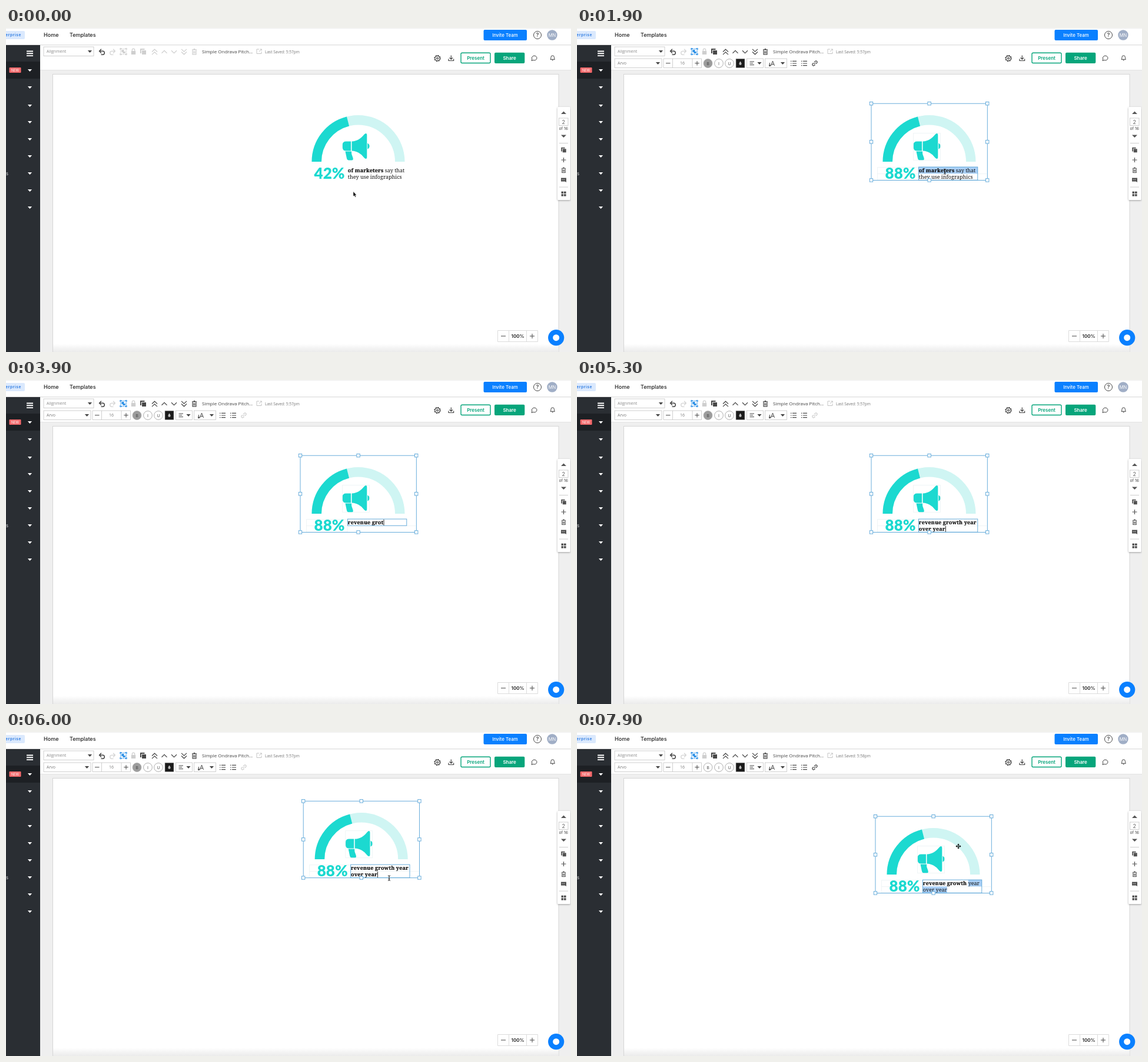
Animation, 960 px wide and 550 px high, one loop 8000 ms. Source, as an HTML page:

```html
<!DOCTYPE html>
<html lang="en">
<head>
<meta charset="utf-8">
<title>Infographic editor</title>
<style>
html, body { margin: 0; width: 100%; height: 100%; overflow: hidden; background: #fff; }
svg { display: block; width: 100vw; height: 100vh; }
text { white-space: pre; font-family: Inter, sans-serif; fill: #222; }
.ui { font-family: "Open Sans", sans-serif; font-size: 7px; fill: #777; }
.mid { text-anchor: middle; }
.body { font: 9px "Noto Serif", serif; fill: #111; }
.b { font-weight: 700; letter-spacing: .13px; stroke: #111; stroke-width: .18; }
.num { font: 900 26px Lato, sans-serif; fill: #1cd9d0; text-anchor: end; }
.line { fill: none; stroke: #444; stroke-width: 1.2; }
.thin { stroke-width: 1; }
.box { fill: #fff; stroke: #c4c4c4; stroke-width: .8; }
.acts { color: #cfcfcf; }
.acts.on { color: #484848; }
.ic { fill: none; stroke: currentColor; stroke-width: 1.2; }
.fill { fill: currentColor; stroke: none; }
.guide { fill: none; stroke: #e4eef0; stroke-width: .6; }
.sel { fill: none; stroke: #5aa5d8; stroke-width: .9; }
.handle { fill: #fff; stroke: #5aa5d8; stroke-width: .9; }
</style>
</head>
<body>
<svg viewBox="0 0 960 550">
  <defs>
    <linearGradient id="fade" x1="0" y1="0" x2="0" y2="1">
      <stop offset="0" stop-color="#fff"/><stop offset="1" stop-color="#ebebeb"/>
    </linearGradient>
    <filter id="shadow" x="-30%" y="-10%" width="160%" height="120%">
      <feDropShadow dx="0" dy="1" stdDeviation="1.5" flood-opacity=".35"/>
    </filter>
    <path id="caret" d="M-3.6-1.9H3.6L0 2z"/>
    <path id="chev" d="M-4.5 2.3L0-2L4.5 2.3"/>
    <path id="copy" class="fill" d="M-5-5H2.5V-3H-3V3H-5z M-2-2H5V5H-2z"/>
    <path id="bin" d="M-3-2.6V4.6H3V-2.6M-4-3.4H4M-1.3-4.6H1.3M-1-1V3M1-1V3"/>
    <path id="list" d="M-2-3.6H5M-2 0H5M-2 3.6H5M-5-3.6h1.5M-5 0h1.5M-5 3.6h1.5"/>
  </defs>

  <!-- page -->
  <rect width="960" height="550" fill="#fff"/>
  <rect x="58" y="72" width="902" height="478" fill="#efefef"/>
  <rect x="79.5" y="78.5" width="859.5" height="475" fill="#fff" stroke="#d6d6d6"/>
  <rect x="80" y="536" width="858.5" height="14" fill="url(#fade)"/>
  <path d="M58 71.5H960" stroke="#e4e4e4"/>
  <path d="M0 28.8H960" stroke="#d4d4d4"/>
  <path d="M0 .3H960" stroke="#d8d8d8" stroke-width=".6"/>

  <!-- header -->
  <rect x="-10" y="5" width="42" height="14" rx="2" fill="#dbe9fd"/>
  <text x="26" y="14.3" font-size="6.6" font-weight="600" letter-spacing=".6" text-anchor="end" style="fill:#2878e0">Enterprise</text>
  <text x="64" y="15.3" font-size="9" font-weight="500">Home</text>
  <text x="108" y="15.3" font-size="9" font-weight="500">Templates</text>
  <rect x="811.5" y="3" width="73.5" height="18" rx="2" fill="#0a80ff"/>
  <text class="mid" x="848" y="15" font-size="7.9" font-weight="500" style="fill:#fff">Invite Team</text>
  <circle class="line thin" cx="903" cy="12" r="6.5"/>
  <text class="mid" x="903" y="15" font-size="8.5" font-weight="500">?</text>
  <circle cx="928" cy="12" r="8.7" fill="#a0aec6"/>
  <text class="mid" x="928" y="14.8" font-size="7.5" style="fill:#fff">MN</text>

  <!-- sidebar -->
  <rect y="29" width="58" height="521" fill="#2a2e33"/>
  <rect y="57" width="58" height="29" fill="#1d2024"/>
  <path d="M35 39.5H46M35 43.3H46M35 47.1H46" stroke="#fff" stroke-width="1.9"/>
  <rect x="5.5" y="67" width="20" height="9" rx="1" fill="#f5696b"/>
  <text class="mid" x="15.5" y="73.6" font-size="5.6" style="fill:#fff">NEW</text>
  <text x="0" y="250" font-size="7.5" style="fill:#ddd">s</text>
  <g id="carets" fill="#fff"></g>

  <!-- toolbar, first row -->
  <rect class="box" x="64" y="32" width="85" height="15.5"/>
  <text class="ui" x="69" y="42.4" style="fill:#888">Alignment</text>
  <use href="#caret" x="142.5" y="40" fill="#444"/>
  <path id="undo" d="M158.8 39.300H165A3.100 3.100 0 0 1 165 45.300H161.500M162 35.800L158.600 39.300L162 42.800" fill="none" stroke="#444" stroke-width="1.500"/>
  <path d="M185 39.300H179A3.100 3.100 0 0 0 179 45.300H182.500M182 35.800L185.400 39.300L182 42.800" fill="none" stroke="#d4d4d4" stroke-width="1.300"/>
  <g id="group" color="#cfcfcf" transform="translate(199.500 40)">
    <path class="ic thin" d="M-4.500-4.500H4.500V4.500H-4.500z" stroke-dasharray="2 1"/>
    <path class="fill" d="M-3-3H1V0H3V3H-1V1H-3z"/>
    <path class="ic thin" d="M-5.500-3V-5.500H-3M3-5.500H5.500V-3M5.500 3V5.500H3M-3 5.500H-5.500V3"/>
  </g>
  <g color="#cfcfcf"><path class="fill" d="M212.800 39H220.200V45H212.800z"/><path class="ic" d="M214.300 39V37.300a2.200 2.200 0 0 1 4.400 0V39"/></g>
  <g class="acts" id="acts">
    <use href="#copy" x="233" y="40"/>
    <g class="ic">
      <use href="#chev" x="252.500" y="38.200"/><use href="#chev" x="252.500" y="42.800"/>
      <use href="#chev" x="269" y="40.400"/>
      <use href="#chev" transform="translate(285.500 40.600) scale(1 -1)"/>
      <use href="#chev" transform="translate(302.500 38.200) scale(1 -1)"/><use href="#chev" transform="translate(302.500 42.800) scale(1 -1)"/>
      <use href="#bin" x="320" y="40.300"/>
    </g>
  </g>
  <text class="ui" x="333" y="43.300" style="font-size:8px;fill:#444">Simple Ondrava Pitch...</text>
  <path d="M430 36H426V43.500H434V40M430 40L434.300 36M431.500 36H434.300V38.600" fill="none" stroke="#c4c4c4"/>
  <text class="ui" id="saved" x="440" y="43" style="font-size:6.550px"></text>

  <!-- toolbar, text row -->
  <g id="row" visibility="hidden">
    <rect class="box" x="64" y="52" width="80" height="15.5"/>
    <text class="ui" x="69" y="62.4">Arvo</text>
    <use href="#caret" x="137.500" y="60" fill="#444"/>
    <path class="box" d="M147 52H211.500V67.500H147zM162.500 52V67.500M196 52V67.500"/>
    <path class="line thin" d="M151 59.800H158.500M200.300 59.800H207.700M204 56.100V63.500"/>
    <text class="ui mid" id="size" x="179" y="62.400"></text>
    <g fill="#fff" stroke="#a6a6a6" stroke-width=".9">
      <circle id="bold" cx="222.500" cy="60" r="7.400"/><circle cx="241" cy="60" r="7.400"/><circle cx="259" cy="60" r="7.400"/>
    </g>
    <text class="ui mid" x="222.500" y="62.500" style="fill:#444">B</text>
    <text class="ui mid" x="241" y="62.500" style="fill:#444">I</text>
    <text class="ui mid" x="259" y="62.500" style="fill:#444">U</text>
    <rect id="swatch" x="270" y="52.200" width="15" height="15.300" stroke="#aaa" stroke-width=".6"/>
    <path d="M277.500 56.500q3 3.700 1.700 5.400q-1.700 1.700-3.400 0q-1.300-1.700 1.700-5.400" fill="#bbb"/>
    <rect class="box" x="288.500" y="52" width="28" height="15.500"/>
    <path class="line thin" d="M293.500 57H301M293.500 59.800H299M293.500 62.600H301"/>
    <use href="#caret" x="310" y="60" fill="#444"/>
    <rect class="box" x="319.500" y="52" width="37" height="15.500"/>
    <path class="line thin" d="M327.500 59V64M326 62.300L327.500 64.300L329 62.300M329.500 64L332.500 56L335.500 64M330.700 61.500H334.300M326 64.500H329"/>
    <use href="#caret" x="349.500" y="60" fill="#444"/>
    <g class="line"><use href="#list" x="368" y="60"/><use href="#list" x="386" y="60"/></g>
    <g id="link" class="ic" transform="translate(404 60) rotate(-45)">
      <path d="M-1-2H-3a2 2 0 0 0 0 4h2M1-2H3a2 2 0 0 1 0 4H1M-2 0H2"/>
    </g>
  </g>

  <!-- toolbar, right side -->
  <g class="line"><circle cx="733" cy="51.5" r="4.2"/><circle cx="733" cy="51.5" r="1.5"/></g>
  <circle cx="733" cy="51.5" r="5" fill="none" stroke="#444" stroke-width="1.4" stroke-dasharray="1.96 1.96"/>
  <path class="line" d="M756.3 46.5V53M753.5 50.3L756.3 53.2L759.1 50.3M752 52.5V55.5H760.6V52.5"/>
  <rect x="773" y="42.3" width="50" height="17.2" rx="2" fill="#fff" stroke="#07a57b" stroke-width="1.4"/>
  <text class="mid" x="798" y="53.9" font-size="8" font-weight="600" style="fill:#07a57b">Present</text>
  <rect x="830" y="41.7" width="51.3" height="18.3" rx="2" fill="#07a57b"/>
  <text class="mid" x="855.6" y="53.9" font-size="8" font-weight="600" style="fill:#fff">Share</text>
  <path class="line thin" d="M893 55.5L893.8 52.7A4.3 3.9 0 1 1 896 54.6z"/>
  <path class="line thin" d="M925 53.3Q926 52 926 49.5a2.7 2.7 0 0 1 5.4 0Q931.4 52 932.4 53.3zM927.7 54.8h2"/>

  <!-- artwork -->
  <g id="art">
    <g fill="none" stroke-width="16.5">
      <path d="M527.75 227A70.75 70.75 0 0 1 669.25 227" stroke="#cff5f3"/>
      <path d="M527.75 227A70.75 70.75 0 0 1 669.25 227" stroke="#1cd9d0" pathLength="100" stroke-dasharray="42 100"/>
    </g>
    <path fill="#1cd9d0" d="M586 192.500H578Q571.800 192.500 571.800 198V203Q571.800 208.500 578 208.500H586z
      M587.500 192.500C596 192.300 603 188 608.500 180.800Q610 179 611.500 179Q613.300 179 613.300 182V219Q613.300 222 611.500 222Q610 222 608.500 220.200C603 213 596 208.700 587.500 208.500z
      M614.300 195.500q3.300 1.500 3.300 5t-3.300 5z
      M576.500 209.500H587Q586.500 214 589 219Q591.500 224.500 587 224.500H582.500Q579.800 224.500 579 221.500z"/>
    <path id="guides" class="guide" d="M571.500 178.500H617.500V224.500H571.500zM510.500 236.500H580V258H510.500zM510.500 247.500H696"/>
    <g fill="#a9cff6">
      <rect id="hlNum" x="520" y="236" width="57" height="22"/>
      <rect id="hl1" y="235.800" height="11.400"/>
      <rect id="hl2" y="247.200" height="11"/>
    </g>
    <text class="num" id="num" x="575.500" y="256.300"></text>
    <text class="body" id="l1" x="580.800" y="244.700"><tspan class="b"></tspan><tspan></tspan></text>
    <text class="body" x="580.800" y="255.900"><tspan id="l2"></tspan></text>
    <rect id="edit" class="sel" x="580.500" y="236" width="100.300"/>
    <rect id="caretBar" width=".9" height="10" fill="#111"/>
    <g id="frame"><rect class="sel" x="500" y="128.200" width="197.300" height="130.300"/></g>
  </g>

  <!-- page panel -->
  <rect x="937" y="134" width="22" height="158" rx="2" fill="#fff" filter="url(#shadow)"/>
  <path fill="#555" d="M943 146H952L947.5 141.5zM943 181.5H952L947.5 186z"/>
  <rect class="box" x="939.5" y="153" width="15.5" height="12.5"/>
  <text class="mid" x="947.3" y="162.500" font-size="9" style="fill:#666">2</text>
  <text class="mid" x="947.3" y="172.700" font-size="6.800" style="fill:#444">of 16</text>
  <path d="M940 195.500H955M940 270H955" stroke="#ccc"/>
  <g color="#505050">
    <use href="#copy" transform="translate(947.500 207) scale(.85)"/>
    <path class="ic" d="M943.500 224H951.500M947.500 220V228"/>
    <g class="ic"><use href="#bin" transform="translate(947.500 241.300) scale(.9)"/></g>
    <path class="fill" d="M943 254.500H952V262L950 260.500H943z"/>
    <path d="M944.500 257.500H950.500" stroke="#fff" stroke-dasharray="1 1"/>
    <path class="fill" d="M943.500 277.500h3.600v3.600h-3.600zM948 277.500h3.600v3.600H948zM943.500 282h3.600v3.600h-3.600zM948 282h3.600v3.600H948z"/>
  </g>

  <!-- zoom and help -->
  <path d="M835.500 513.500H903.500V532.500H835.500zM854.500 513.500V532.500M884.500 513.500V532.500" fill="#fff" stroke="#dcdcdc"/>
  <path class="line thin" d="M841 523H849M890 523H898M894 519V527"/>
  <text class="mid" x="869.500" y="526" font-size="8" font-weight="600">100%</text>
  <circle cx="934.700" cy="525.700" r="13.600" fill="#0a80ff"/>
  <circle cx="934.700" cy="525.700" r="5.500" fill="#fff"/>

  <!-- pointers -->
  <g id="pointer">
    <path id="arrow" d="M0 0V8.500L1.900 6.900L3.300 9.700L4.700 9L3.400 6.300H5.800z" fill="#000" stroke="#fff" stroke-width=".6"/>
    <path id="beam" d="M-2-4.300Q0-4.300 0-3V3Q0 4.300-2 4.300M2-4.300Q0-4.300 0-3M2 4.300Q0 4.300 0 3M-1.200 1.300H1.200" fill="none" stroke="#222"/>
    <path id="move" d="M-3.500 0H3.500M0-3.500V3.500M-2.300-1.200L-3.700 0L-2.300 1.200M2.300-1.200L3.700 0L2.300 1.200M-1.200-2.300L0-3.700L1.200-2.300M-1.200 2.300L0 3.700L1.200 2.300" fill="none" stroke="#111" stroke-width="1.200"/>
  </g>
</svg>
<script>
const $ = id => document.getElementById(id);
const NS = "http://www.w3.org/2000/svg";
const LOOP = 8000, STEP = 100;
const PHRASE = "revenue growth year over year", WRAP = 19, LEFT = 580.8, RIGHT = 681;

function add(parent, tag, attrs) {
  const el = document.createElementNS(NS, tag);
  for (const key in attrs) el.setAttribute(key, attrs[key]);
  parent.append(el);
}
for (const y of [72, 101, 132, 160, 189, 218, 247, 276, 305])
  add($("carets"), "use", { href: "#caret", x: 40.5, y });
for (let i = 0; i < 9; i++)
  if (i !== 4) add($("frame"), "rect", {
    class: "handle", width: 5.4, height: 5.4,
    x: 497.3 + i % 3 * 98.6, y: 125.5 + Math.floor(i / 3) * 65.1
  });

// each row starts with its step, in tenths of a second
const TYPED = [[24, 0], [25, 1], [26, 2], [27, 3], [28, 4], [30, 5], [32, 6], [35, 7], [36, 8], [37, 9],
  [38, 10], [40, 11], [41, 12], [42, 13], [43, 14], [44, 15], [45, 17], [46, 19], [47, 20], [48, 22],
  [49, 24], [50, 25], [51, 27], [52, 29]];
const NUMBER = [[0, "42%"], [9, "8"], [10, "88"], [11, "88%"]];
const SELECTED = [[0, 0, 0], [17, 0, 2], [18, 0, 12], [19, 0, 21], [20, 0, 30], [21, 0, 42], [24, 0, 0],
  [71, 15, 19], [72, 15, 23], [74, 15, 28]];
const DRAG = [[0, 0, 0], [54, 0, 0], [57, 9, -22], [60, 5.2, -10.9], [61, 7, 15]];
const POINTER = [[0, 590, 277.5, "arrow"], [2, 560, 252, "arrow"], [4, 552, 247, "move"], [6, 550, 247, "beam"],
  [9, 550, 247, ""], [13, 575, 247, "beam"], [19, 625, 244, "beam"], [21, 660, 254, "beam"], [24, 660, 254, ""],
  [54, 646, 259, "move"], [57, 655, 237, "move"], [60, 651, 248, "beam"], [61, 653, 274, "move"],
  [63, 653, 274, "move"], [67, 665, 260, "move"], [70, 665, 258, "beam"], [74, 631, 269, "beam"],
  [76, 636, 240, "move"], [79, 648, 194, "move"]];

const at = (rows, k) => rows.findLast(r => r[0] <= k);
function glide(rows, k) {
  const a = at(rows, k), b = rows[rows.indexOf(a) + 1] || a;
  const p = a === b ? 0 : (k - a[0]) / (b[0] - a[0]);
  return [1, 2].map(i => a[i] + (b[i] - a[i]) * p);
}
const show = (el, on) => el.setAttribute("visibility", on ? "visible" : "hidden");

function lines(k) {
  if (k < 24) return ["of marketers", " say that", "they use infographics"];
  const s = k === 39 ? "revenue grot" : PHRASE.slice(0, at(TYPED, k)[1]);
  const first = s.slice(0, WRAP), cut = k >= 76 ? 15 : WRAP;
  return [first.slice(0, cut), first.slice(cut), s.slice(WRAP + 1)];
}

function mark(rect, text, from, to, full) {
  const n = text.textContent.length;
  from = Math.max(from, 0);
  show(rect, to > from);
  if (to <= from) return;
  const x = LEFT + (from ? text.getSubStringLength(0, from) : 0);
  const end = full && to >= n ? RIGHT : LEFT + text.getSubStringLength(0, Math.min(to, n));
  rect.setAttribute("x", x);
  rect.setAttribute("width", end - x);
}

function draw(k) {
  const [bold, plain, second] = lines(k), first = bold + plain;
  const picked = k >= 4, editing = k >= 15, onNumber = k >= 6 && k < 15;

  // text
  $("num").textContent = at(NUMBER, k)[1];
  $("l1").children[0].textContent = bold;
  $("l1").children[1].textContent = plain;
  $("l2").textContent = second;
  $("l2").classList.toggle("b", k >= 24 && k < 76);

  // selection and caret
  const [, from, to] = at(SELECTED, k);
  mark($("hl1"), $("l1"), from, Math.min(to, first.length), true);
  mark($("hl2"), $("l2"), from - first.length, to - first.length, false);
  show($("hlNum"), k >= 6 && k < 9);
  show($("caretBar"), k >= 24 && k < 63);
  const last = second ? $("l2") : $("l1");
  $("caretBar").setAttribute("x", LEFT + last.getComputedTextLength() + .3);
  $("caretBar").setAttribute("y", second ? 247.8 : 236.8);
  show($("edit"), editing);
  $("edit").setAttribute("height", second ? 22.2 : 11.2);
  show($("frame"), picked);
  show($("guides"), picked);
  $("art").setAttribute("transform", `translate(${glide(DRAG, k)})`);

  // toolbar
  $("acts").classList.toggle("on", picked);
  $("group").setAttribute("color", picked ? "#2b8fe6" : "#cfcfcf");
  show($("row"), k >= 6);
  $("size").textContent = onNumber ? 40 : 16;
  $("swatch").setAttribute("fill", onNumber ? "#1cd9d0" : "#1a1a1a");
  $("bold").setAttribute("fill", k < 76 ? "#9c9c9c" : "#fff");
  $("link").setAttribute("color", to > from || k < 9 ? "#484848" : "#cfcfcf");
  $("saved").textContent = `Last Saved: 5:${k < 63 ? 57 : 58}pm`;

  // pointer
  const kind = at(POINTER, k)[3];
  $("pointer").setAttribute("transform", `translate(${glide(POINTER, k)})`);
  for (const id of ["arrow", "beam", "move"]) show($(id), id === kind);
}

const start = performance.now();
function tick(now) {
  draw(Math.floor(Math.max(now - start, 0) % LOOP / STEP));
  requestAnimationFrame(tick);
}
draw(0);
requestAnimationFrame(tick);
</script>
</body>
</html>
```
